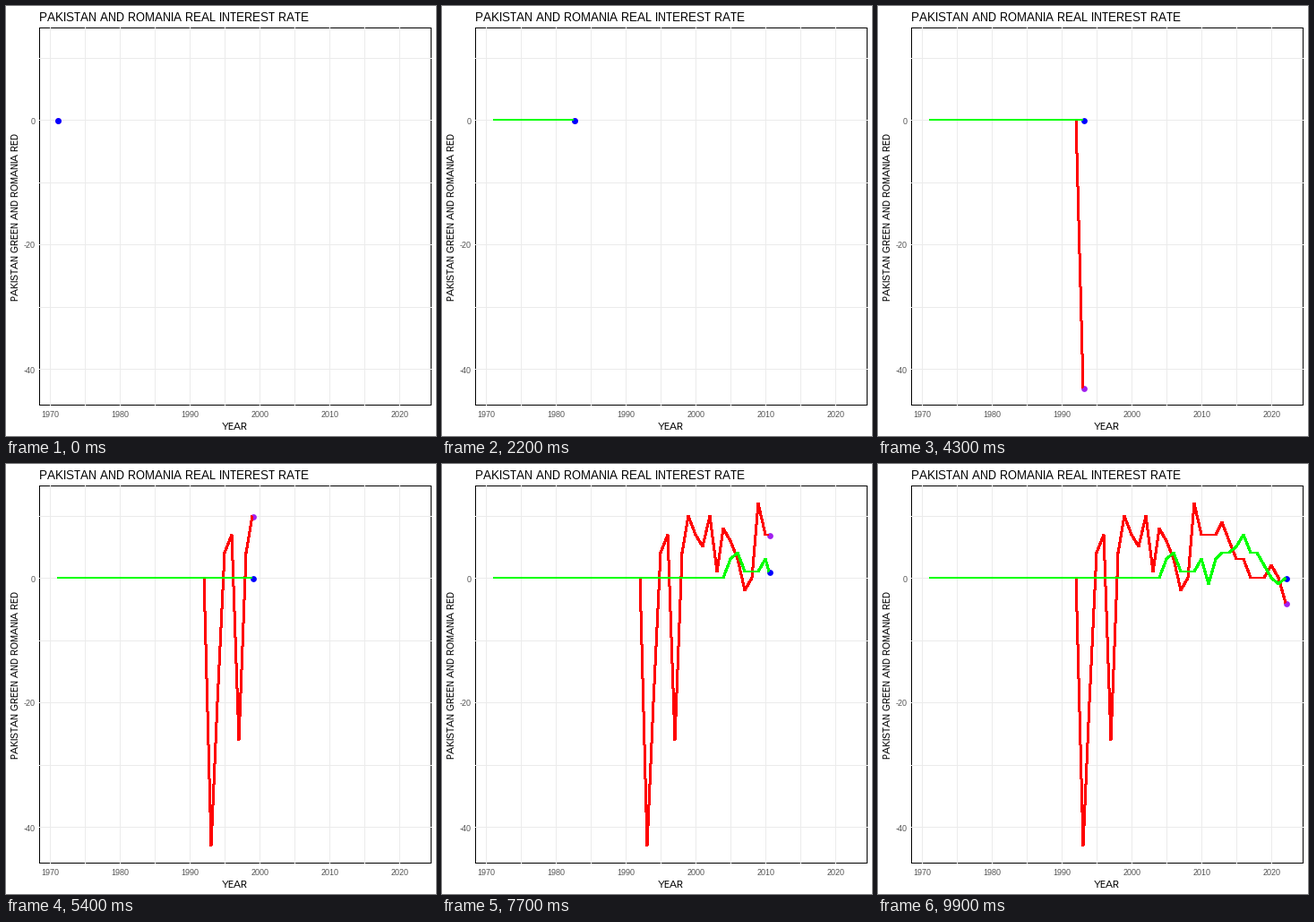
Write a matplotlib script that moves like this. It is 480 px wide and 480 px high and loops after 10 s.

```python
import numpy as np
import matplotlib.pyplot as plt
from matplotlib.animation import FuncAnimation
from matplotlib.patches import Rectangle

SIZE, DPI = 480, 100
FRAMES, INTERVAL = 100, 100
PT = 72 / DPI  # points per pixel
LEFT, TOP, RIGHT, BOTTOM = 37, 24, 474, 445

plt.rcParams.update({
    "font.family": "Liberation Sans",
    "text.hinting": "native",
    "text.hinting_factor": 1,
})

years = np.arange(1971, 2023)
green = np.zeros(len(years))
green[years >= 2005] = [3, 4, 1, 1, 1, 3, -1, 3, 4, 4, 5, 7, 4, 4, 2, 0, -1, 0]
red = np.zeros(len(years))
red[years >= 1993] = [-43, -20, 4, 7, -26, 4, 10, 7, 5, 10, 1, 8, 6, 3, -2,
                      0, 12, 7, 7, 7, 9, 6, 3, 3, 0, 0, 0, 2, 0, -4]

# Each year lands on a whole frame; values are tweened linearly in between.
keys = np.round((years - years[0]) * (FRAMES - 1) / (years[-1] - years[0]))


def px(year):
    return np.round(37.3 + (np.asarray(year) - 1968.45) * 7.793)


def py(value):
    return np.round(24.7 + (14.75 - np.asarray(value)) * 6.95)


fig = plt.figure(figsize=(SIZE / DPI, SIZE / DPI), dpi=DPI, facecolor="white")
ax = fig.add_axes([0, 0, 1, 1])
ax.set_xlim(0, SIZE)
ax.set_ylim(SIZE, 0)
ax.axis("off")


def label(x, y, text, size, color="black", **kw):
    ax.text(x, y, text, fontsize=size * PT, color=color, **kw)


def grid_line(xs, ys):
    ax.plot(xs, ys, color="#EBEBEB", lw=PT, antialiased=False, snap=False,
            solid_capstyle="butt", zorder=2)


ax.add_patch(Rectangle((LEFT + 0.5, TOP + 0.5), RIGHT - LEFT, BOTTOM - TOP,
                       fill=False, ec="black", lw=PT, antialiased=False,
                       snap=False, zorder=1))

for year in range(1970, 2021, 5):
    x = px(year) + 0.5
    grid_line([x, x], [TOP, BOTTOM + 1])
    if year % 10 == 0:
        label(x, 459, str(year), 9, "#4D4D4D", ha="center", va="baseline")

for value in range(-40, 11, 10):
    y = py(value) + 0.5
    grid_line([LEFT, RIGHT + 1], [y, y])
    if value % 20 == 0:
        label(32.5, y + 4, str(value), 9, "#4D4D4D", ha="right", va="baseline")

label(37, 17, "PAKISTAN AND ROMANIA REAL INTEREST RATE", 13, va="baseline")
label(255, 473, "YEAR", 11, ha="center", va="baseline")
label(16, 235.5, "PAKISTAN GREEN AND ROMANIA RED", 11, rotation=90,
      ha="right", va="center")


def make_series(values, line_color, dot_color, z):
    dot, = ax.plot([], [], "o", color=dot_color, ms=6.8 * PT, mew=0,
                   antialiased=False, zorder=z)
    line, = ax.plot([], [], color=line_color, lw=2 * PT, antialiased=False,
                    snap=False, solid_capstyle="butt",
                    solid_joinstyle="round", zorder=z + 1)
    return values, line, dot


series = [make_series(red, "#FF0000", "#A020F0", 3),
          make_series(green, "#00FF00", "#0000FF", 5)]


def update(frame):
    past = keys < frame
    now = np.interp(frame, keys, years)
    xs = px(np.append(years[past], now))
    for values, line, dot in series:
        ys = py(np.append(values[past], np.interp(frame, keys, values)))
        line.set_data(xs, ys)
        dot.set_data([xs[-1] + 0.5], [ys[-1] + 0.5])
    return [artist for _, line, dot in series for artist in (line, dot)]


anim = FuncAnimation(fig, update, frames=FRAMES, interval=INTERVAL,
                     repeat=True, repeat_delay=0, blit=False)
plt.show()
```
